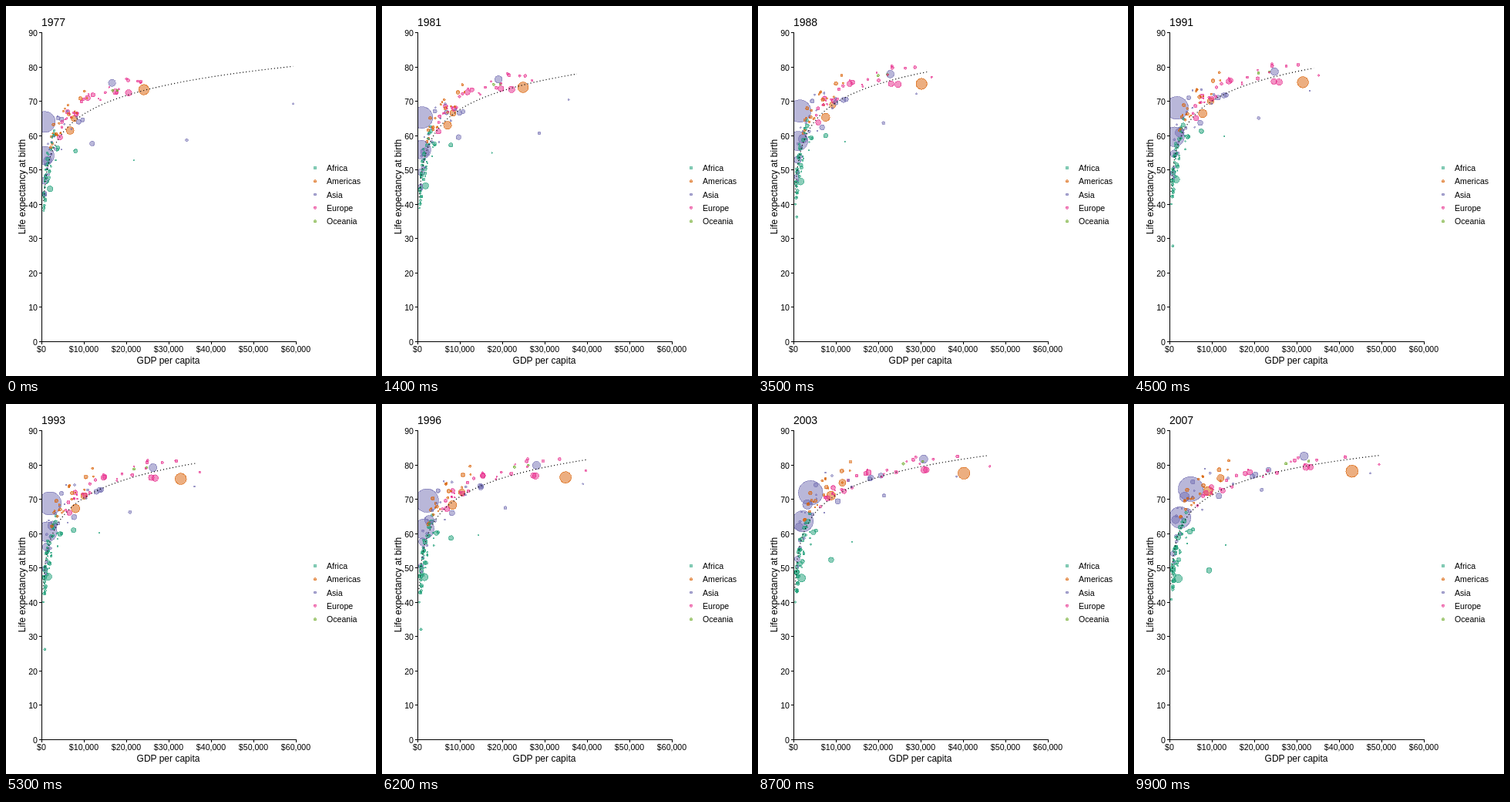
Write an HTML page that moves like this. It is 480 px wide and 480 px high and loops after 10 s.

```html
<!DOCTYPE html>
<html lang="en">
<head>
<meta charset="utf-8">
<title>Life expectancy and GDP</title>
<style>
  html, body { margin: 0; width: 100%; height: 100%; overflow: hidden; background: #fff; }
  svg { display: block; width: 480px; height: 480px; }
  text { font: 10.6px "Liberation Sans", Arial, sans-serif; fill: #000; }
  .name { font-size: 12px; text-anchor: middle; }
  .year { font-size: 14px; }
  .axis { stroke: #000; fill: none; shape-rendering: crispEdges; }
  .dot { fill-opacity: .5; stroke-opacity: .6; shape-rendering: crispEdges; }
  .fit { fill: none; stroke: #000; stroke-width: 1.2; stroke-dasharray: 1.1 3; }
</style>
</head>
<body>
<svg id="stage" viewBox="0 0 480 480">
  <clipPath id="panel"><rect x="47" y="34" width="330" height="401"/></clipPath>
  <text id="year" class="year" x="46" y="26"></text>
  <text class="name" x="210.5" y="464">GDP per capita</text>
  <text class="name" transform="translate(25 234.5) rotate(-90)">Life expectancy at birth</text>
  <g id="plot" clip-path="url(#panel)"></g>
  <g id="axes"></g>
</svg>
<script>
const COLORS = {
  Africa: '#1b9e77', Americas: '#d95f02', Asia: '#7570b3',
  Europe: '#e7298a', Oceania: '#66a61e'
};
const GROWTH = { Africa: 2.1, Americas: 1.4, Asia: 1.42, Europe: 1.1, Oceania: 1.4 };
const FRAMES = 100, STEP = 100, START = 1977, SPAN = 30;

const byId = id => document.getElementById(id);
const axes = byId('axes'), plot = byId('plot'), yearLabel = byId('year');

function el(parent, tag, attrs, text) {
  const node = document.createElementNS('http://www.w3.org/2000/svg', tag);
  for (const k in attrs) node.setAttribute(k, attrs[k]);
  if (text) node.textContent = text;
  parent.appendChild(node);
  return node;
}

// GDP is in thousands of dollars, population in millions.
const px = gdp => 46.3 + gdp * 5.5;
const py = life => 435.2 - life * 4.45;
const radius = pop => 0.3 + 15.7 * Math.sqrt(pop / 1319);

// Linear path through evenly spaced values, p from 0 to 1.
function along(values, p) {
  const pos = p * (values.length - 1);
  const i = Math.min(Math.floor(pos), values.length - 2);
  return values[i] + (values[i + 1] - values[i]) * (pos - i);
}

let seed = 77;
function rand(lo, hi) {
  seed = (seed * 16807) % 2147483647;
  return lo + (hi - lo) * seed / 2147483647;
}
// Even on a log scale.
const spread = ([lo, hi], u) => lo * (hi / lo) ** u;

// Log-linear fit: its right end moves, its slope eases off late.
const fitMax = p => along([59.3, 33.7, 31.5, 34.9, 41.3, 44.7, 49.4], p);
const fitTop = p => along([80.2, 77.6, 78.5, 80.1, 82, 82.8, 82.8], p);
const fitMin = p => .39 - .12 * p;
const fitLife = (gdp, p) =>
  fitTop(p) - (7.8 - .6 * p ** 8) * Math.log(fitMax(p) / gdp);

const bubbles = [];

// A bubble on its own path.
function lead(region, pop, gdp, life) {
  bubbles.push({ region, pop, gdp: p => along(gdp, p), life: p => along(life, p) });
}

// Countries that grow steadily and keep near the fit.
function crowd(region, count, { pop, gdp, growth, offset, drift }) {
  for (let i = 0; i < count; i++) {
    const g0 = spread(gdp, (i + rand(0, 1)) / count);
    const rate = rand(...growth), off = rand(...offset);
    const g = p => g0 * rate ** p;
    bubbles.push({
      region, pop: spread(pop, rand(0, 1)), gdp: g,
      life: p => fitLife(g(p), p) + off + drift * p
    });
  }
}

lead('Asia', 943, [.74, 1.38, 2.29, 4.96], [64, 73]);
lead('Asia', 700, [.81, 1.16, 2.45], [54.2, 60.2, 64.7]);
lead('Asia', 137, [1.4, 3.5], [52.7, 70.7]);
lead('Asia', 100, [16.6, 22.4, 28.8, 31.7], [75.4, 82.6]);
lead('Asia', 90, [.7, 1.4], [46.9, 64.1]);
lead('Asia', 40, [11.9, 6.6, 8.3, 11.6], [57.7, 71]);
lead('Asia', 34, [4.7, 12.1, 23.3], [64.8, 78.6]);
lead('Asia', 12, [34.2, 21.2, 20.6, 21.7], [58.7, 72.8]);
lead('Asia', 1.5, [59.3, 31.4, 28.1, 34.9, 40.3, 35.1, 47.3], [69.3, 77.6]);
lead('Americas', 220, [24.1, 25, 29.9, 32, 35.8, 39.1, 43], [73.4, 78.2]);
lead('Americas', 120, [6.7, 9.1], [61.5, 72.4]);
lead('Americas', 70, [7.7, 12], [65, 76.2]);
lead('Africa', 62, [2, 1.5, 2], [44.5, 47.5, 46.9]);
lead('Africa', 24, [8, 7.4, 9.3], [55.5, 61.9, 49.3]);
lead('Africa', .7, [21.7, 11.9, 14.7, 13.2], [52.8, 60.5, 56.7]);
lead('Africa', 5, [.7, .8], [45, 45, 24, 40, 46]);
lead('Europe', 78, [20.5, 32.2], [72.5, 79.4]);
lead('Europe', 56, [17.4, 33.2], [72.8, 79.4]);
lead('Europe', 46, [4.3, 8.5], [59.5, 71.8]);
lead('Europe', 4, [23.3, 49.4], [75.4, 80.2]);

crowd('Africa', 47, {
  pop: [.5, 22], gdp: [.45, 4], growth: [.75, 1.6], offset: [-6, 5], drift: -3
});
crowd('Asia', 22, {
  pop: [1, 45], gdp: [.6, 11], growth: [1, 2.4], offset: [-5, 7], drift: 2
});
crowd('Americas', 21, {
  pop: [1, 25], gdp: [2, 11], growth: [1, 1.6], offset: [-3, 7], drift: 1
});
crowd('Europe', 25, {
  pop: [1, 50], gdp: [4.5, 25], growth: [1.3, 1.8], offset: [1.5, 5], drift: -2
});
crowd('Oceania', 2, {
  pop: [3, 14], gdp: [16, 18.5], growth: [1.6, 1.9], offset: [2, 3], drift: -1
});

function drawAxes() {
  el(axes, 'path', { class: 'axis', d: 'M46.5 34V435.5H377' });
  for (let v = 0; v <= 90; v += 10) {
    const y = Math.floor(435.3 - v * 4.45) + .5;
    el(axes, 'path', { class: 'axis', d: `M43 ${y}H46` });
    el(axes, 'text', { x: 41, y: y + 4, 'text-anchor': 'end' }, String(v));
  }
  for (let v = 0; v <= 60; v += 10) {
    const x = 46.5 + v * 5.5;
    el(axes, 'path', { class: 'axis', d: `M${x} 436V439` });
    el(axes, 'text', { x: x - .5, y: 449, 'text-anchor': 'middle' }, v ? `$${v},000` : '$0');
  }
  Object.keys(COLORS).forEach((region, i) => {
    const y = 210 + i * 17.28, c = COLORS[region];
    el(axes, 'circle', { class: 'dot', cx: 401, cy: y, r: 1.6, fill: c, stroke: c });
    el(axes, 'text', { x: 416, y: y + 4 }, region);
  });
}

drawAxes();
bubbles.sort((a, b) => b.pop - a.pop);
for (const b of bubbles) {
  const c = COLORS[b.region];
  b.node = el(plot, 'circle', { class: 'dot', fill: c, stroke: c });
}
const fitLine = el(plot, 'polyline', { class: 'fit' });

function drawFit(p) {
  const min = fitMin(p), max = fitMax(p), points = [];
  for (let i = 0; i < 80; i++) {
    const gdp = min + (max - min) * i / 79;
    points.push(px(gdp).toFixed(2) + ',' + py(fitLife(gdp, p)).toFixed(2));
  }
  fitLine.setAttribute('points', points.join(' '));
}

function draw(frame) {
  const p = frame / (FRAMES - 1);
  yearLabel.textContent = Math.round(START + SPAN * p);
  for (const b of bubbles) {
    const pop = b.pop * (1 + (GROWTH[b.region] - 1) * p);
    b.node.setAttribute('cx', px(b.gdp(p)).toFixed(2));
    b.node.setAttribute('cy', py(b.life(p)).toFixed(2));
    b.node.setAttribute('r', radius(pop).toFixed(2));
  }
  drawFit(p);
}

let shown = -1;
const begin = performance.now();
function tick() {
  const frame = Math.floor((performance.now() - begin) / STEP) % FRAMES;
  if (frame !== shown) draw(shown = frame);
  requestAnimationFrame(tick);
}
tick();
</script>
</body>
</html>
```
